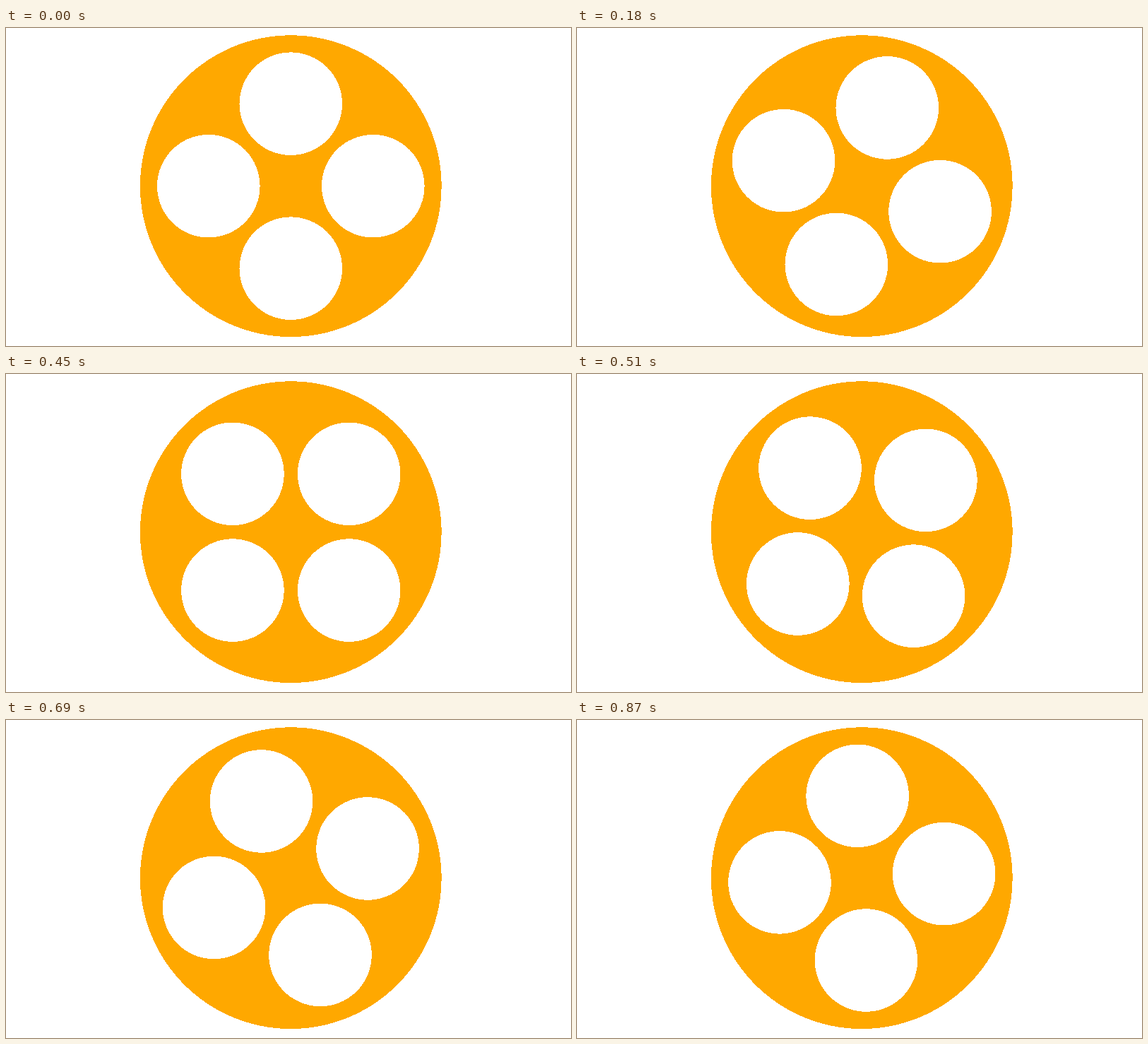
An HTML page that plays this animation: 800 by 450 pixels, repeating every 0.9 s.

```html
<!DOCTYPE html>
<html lang="en">
<head>
<meta charset="utf-8">
<title>Turning reel</title>
<style>
  html, body { margin: 0; width: 100%; height: 100%; overflow: hidden; background: #fff; }
  svg { display: block; width: 100%; height: 100%; }
</style>
</head>
<body>
<svg viewBox="0 0 800 450" shape-rendering="crispEdges">
  <g transform="translate(403.3 223.7)">
    <circle r="213.4" fill="#ffa800"/>
    <g id="holes" fill="#fff">
      <circle cx="116.5" r="72.8"/>
      <circle cx="-116.5" r="72.8"/>
      <circle cy="116.5" r="72.8"/>
      <circle cy="-116.5" r="72.8"/>
    </g>
  </g>
</svg>
<script>
  const LOOP = 900, STEP = 30, DEGREES_PER_STEP = 3;
  const holes = document.getElementById('holes');

  function draw() {
    const step = Math.floor((performance.now() % LOOP) / STEP);
    holes.setAttribute('transform', `rotate(${step * DEGREES_PER_STEP})`);
    requestAnimationFrame(draw);
  }
  draw();
</script>
</body>
</html>
```
